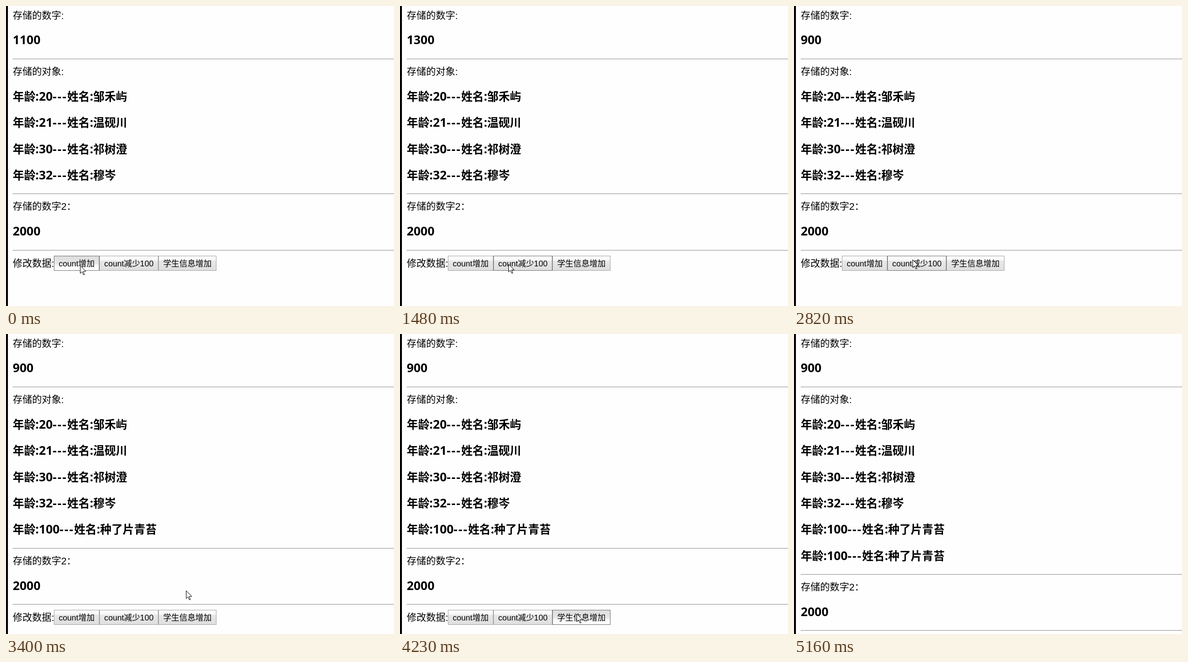
Write an HTML page that moves like this. It is 802 px wide and 621 px high and loops after 5580 ms.

```html
<!DOCTYPE html>
<html lang="zh-CN">
<head>
<meta charset="utf-8">
<style>
html, body { margin: 0; width: 100%; height: 100%; overflow: hidden; }
main {
  position: relative; box-sizing: border-box; width: 100%; height: 100%; overflow: hidden;
  padding: 4.8px 0 0 10px; border-left: 4px solid #000; background: #fefefe; color: #000;
  font: 20px/26.4px "Liberation Sans", "Noto Sans CJK SC", sans-serif; white-space: nowrap;
}
p { position: relative; top: 2px; margin: 0; }
h3 { margin: 23.4px 0; font: bold 23.4px/31px "Noto Sans CJK SC", sans-serif; }
h3 span { font: bold 25px/0 "Noto Sans", sans-serif; }
h3 .dash { letter-spacing: 1.9px; }
main > h3:first-of-type { position: relative; top: -1px; }
hr {
  box-sizing: border-box; height: 2px; margin: 10px -10px 10px 0;
  border: 1px solid #9a9a9a; border-bottom-color: #eee;
}
.actions { display: flex; height: 31px; line-height: 31px; }
.actions label { position: relative; top: 1px; width: 85px; }
button {
  margin: 0; padding: 0 9px; border: 1px solid #a3a3a3; border-radius: 0; color: #000;
  font: 16.67px "Liberation Sans", "Noto Sans CJK SC", sans-serif;
  background: linear-gradient(#fff, #f6f6f6 30%, #e8e8e8 30%, #dfdfdf);
}
button.hover { border-color: #707070; }
button.pressed { background: linear-gradient(#dedede, #e8e8e8 60%, #f6f6f6 60%, #fff); }
#cursor { position: absolute; left: 0; top: 0; }
</style>
</head>
<body>
<main>
  <p>存储的数字:</p>
  <h3><span id="count"></span></h3>
  <hr>
  <p>存储的对象:</p>
  <div id="students"></div>
  <hr>
  <p>存储的数字2：</p>
  <h3><span>2000</span></h3>
  <hr>
  <div class="actions">
    <label>修改数据:</label>
    <button>count增加</button><button>count减少100</button><button>学生信息增加</button>
  </div>
</main>
<svg id="cursor" width="13" height="21">
  <path d="M.5 .5V16.5L4.2 13L6.8 19H9.2L6.8 12.2H12Z" fill="#fff" stroke="#000"/>
</svg>
<script>
const LOOP = 5580;
const HOLD = 150; // how long a button stays down before its click takes effect
const POINTER_EXIT = 5160;

const students = [
  [20, '邹禾屿'], [21, '温砚川'], [30, '祁树澄'], [32, '穆岑'],
  [100, '种了片青苔'], [100, '种了片青苔']
];

// Click times of each button
const clicks = {
  increase: [150, 450, 570, 1090],
  decrease: [1990, 2270, 2390, 2820],
  addStudent: [3400, 4380]
};
const allClicks = Object.values(clicks).flat();

const home = { x: 153, y: 537 };
const moves = [
  { from: 1210, to: 1480, x: 224, y: 534 },
  { from: 1480, to: 1730, x: 245, y: 525 },
  { from: 2900, to: 2940, x: 349, y: 492 },
  { from: 2940, to: 3250, x: 372, y: 531 },
  { from: 3530, to: 4100, x: 365, y: 579 },
  { from: 4380, to: 4650, x: 553, y: 441 },
  { from: 4650, to: 4800, x: 517, y: 424 },
  { from: 4800, to: 5040, x: 712, y: 585 }
];

const byId = id => document.getElementById(id);
const done = (times, now) => times.filter(time => time <= now).length;

byId('students').innerHTML = students.map(([age, name]) =>
  `<h3>年龄<span>:${age}</span><span class="dash">---</span>姓名<span>:</span>${name}</h3>`).join('');
const rows = [...byId('students').children];
const buttons = [...document.querySelectorAll('button')];

function pointerAt(now) {
  return moves.reduce((p, move) => {
    const k = Math.min(1, Math.max(0, (now - move.from) / (move.to - move.from)));
    return { x: p.x + (move.x - p.x) * k, y: p.y + (move.y - p.y) * k };
  }, home);
}

function render(now) {
  const { x, y } = pointerAt(now);
  const down = allClicks.some(time => now >= time - HOLD && now < time);
  const visible = 4 + done(clicks.addStudent, now);

  byId('count').textContent = 1100 + 50 * done(clicks.increase, now) - 100 * done(clicks.decrease, now);
  rows.forEach((row, i) => row.hidden = i >= visible);
  byId('cursor').style.transform = `translate(${Math.round(x)}px, ${Math.round(y)}px)`;
  byId('cursor').style.visibility = now < POINTER_EXIT ? 'visible' : 'hidden';
  for (const button of buttons) {
    const box = button.getBoundingClientRect();
    const hover = x >= box.left && x < box.right && y >= box.top && y < box.bottom;
    button.classList.toggle('hover', hover);
    button.classList.toggle('pressed', hover && down);
  }
}

const origin = performance.now();
function tick() {
  render((performance.now() - origin) % LOOP);
  requestAnimationFrame(tick);
}
tick();
</script>
</body>
</html>
```
